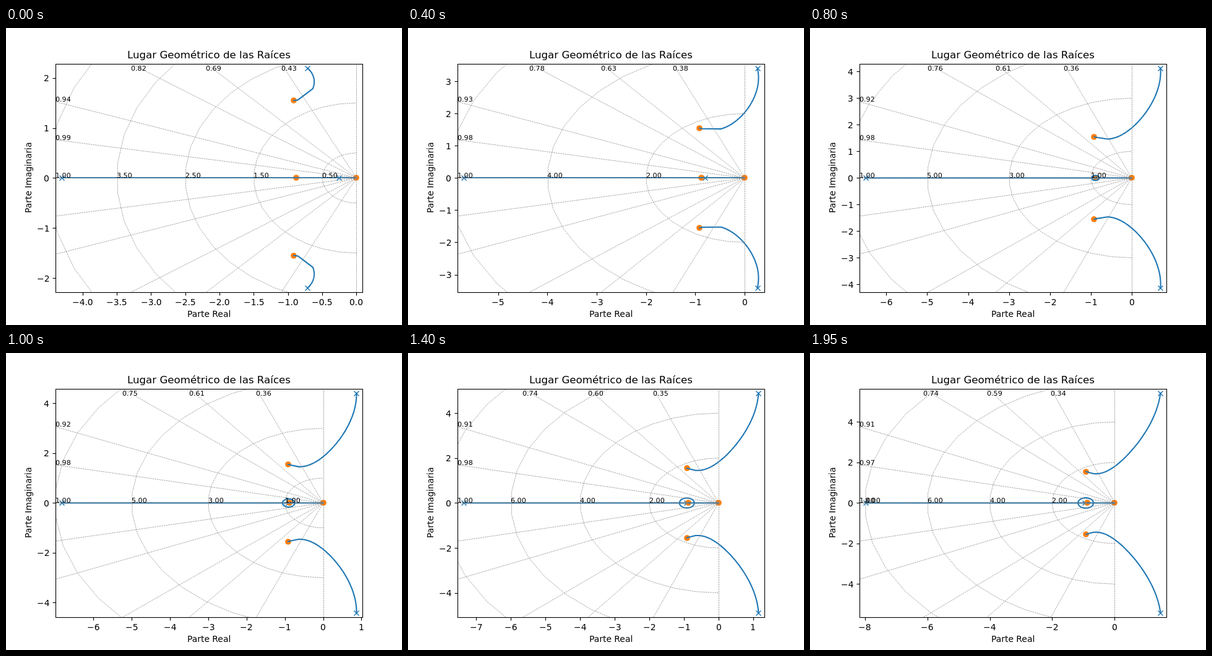
Write an HTML page with a canvas that moves like this. It is 640 px wide and 480 px high and loops after 2 s.

```html
<!DOCTYPE html>
<html lang="es">
<head>
<meta charset="utf-8">
<title>Lugar Geométrico de las Raíces</title>
<style>
html, body { margin: 0; width: 100%; height: 100%; overflow: hidden; background: #fff; }
canvas { display: block; }
</style>
</head>
<body>
<canvas id="stage" width="640" height="480"></canvas>
<script>
const ctx = document.getElementById('stage').getContext('2d');
const W = 640, H = 480, STEPS = 40, STEP_MS = 50;
const BOX = { l: 80, t: 57.6, r: 576, b: 427.2 };
const PT = 100 / 72;
const BLUE = '#1f77b4', ORANGE = '#ff7f0e', GRAY = '#808080';
const FONT = '"DejaVu Sans", Verdana, sans-serif';

// ---- complex numbers [re, im] and polynomials (highest power first)
const add = (a, b) => [a[0] + b[0], a[1] + b[1]];
const sub = (a, b) => [a[0] - b[0], a[1] - b[1]];
const mul = (a, b) => [a[0] * b[0] - a[1] * b[1], a[0] * b[1] + a[1] * b[0]];
const div = (a, b) => {
  const d = b[0] * b[0] + b[1] * b[1];
  return [(a[0] * b[0] + a[1] * b[1]) / d, (a[1] * b[0] - a[0] * b[1]) / d];
};
const abs = a => Math.hypot(a[0], a[1]);
const evalPoly = (p, z) => p.reduce((s, c) => add(mul(s, z), [c, 0]), [0, 0]);
const deriv = p => p.slice(0, -1).map((c, i) => c * (p.length - 1 - i));
function times(p, q) {
  const out = new Array(p.length + q.length - 1).fill(0);
  p.forEach((a, i) => q.forEach((b, j) => { out[i + j] += a * b; }));
  return out;
}

// Durand-Kerner, largest roots first
function roots(poly) {
  const p = poly.map(c => c / poly[0]), n = p.length - 1;
  let rad = 0;
  for (let i = 1; i <= n; i++) rad = Math.max(rad, Math.abs(p[i]) ** (1 / i));
  const z = [];
  for (let i = 0; i < n; i++) {
    const a = 2 * Math.PI * i / n + 0.4;
    z.push([rad * Math.cos(a), rad * Math.sin(a)]);
  }
  for (let it = 0; it < 300; it++) {
    let move = 0;
    for (let i = 0; i < n; i++) {
      let d = [1, 0];
      for (let j = 0; j < n; j++) if (j !== i) d = mul(d, sub(z[i], z[j]));
      if (abs(d) === 0) continue;
      const s = div(evalPoly(p, z[i]), d);
      z[i] = sub(z[i], s);
      move = Math.max(move, abs(s));
    }
    if (move < 1e-12) break;
  }
  for (const r of z) if (Math.abs(r[1]) < 1e-6) r[1] = 0;
  return z.sort((a, b) => {
    const d = abs(b) - abs(a);
    return Math.abs(d) > 1e-8 ? d : b[1] - a[1];
  });
}

// ---- root locus
const NUM = [1, 19 / 7, 34 / 7, 20 / 7, 0];
const ZEROS = roots(NUM.slice(0, 4)).concat([[0, 0]]);

// Keeps each branch in its own column by nearest neighbour
function sortRows(rows) {
  let prev = null;
  return rows.map(row => {
    if (!prev) return (prev = row.z);
    const out = [], free = prev.map((_, i) => i);
    for (const e of row.z) {
      let best = 0;
      free.forEach((c, i) => {
        if (abs(sub(e, prev[c])) < abs(sub(e, prev[free[best]]))) best = i;
      });
      out[free.splice(best, 1)[0]] = e;
    }
    return (prev = out);
  });
}

function limits(v) {
  const lo = Math.min(...v), hi = Math.max(...v), d = (hi - lo) * 0.02;
  return { lo: lo - d, hi: hi + d, tol: (hi - lo) * 0.05 };
}

function locus(gain) {
  const den = [1, 6, 13, 20 + 6 * gain, 6 * gain];
  const poles = roots(den);
  const rowAt = k => ({ k, z: roots(den.map((c, i) => c + k * NUM[i])) });

  const a = times(den, deriv(NUM)), b = times(NUM, deriv(den));
  const breaks = roots(a.map((c, i) => c - b[i]).slice(1))
    .map(s => ({ s, k: -div(evalPoly(den, s), evalPoly(NUM, s))[0] }))
    .filter(o => o.k >= 0);

  const kmax = Math.max(3, ...breaks.map(o => o.k));
  const ks = breaks.map(o => o.k);
  for (let i = 0; i < 50; i++) ks.push(kmax * i / 49);
  let rows = ks.sort((x, y) => x - y).map(rowAt);
  let mat = sortRows(rows);

  const pts = mat.flat().concat(ZEROS, poles, breaks.map(o => o.s));
  const xl = limits(pts.map(p => p[0])), yl = limits(pts.map(p => p[1]));
  const tol = Math.min(xl.tol, yl.tol);

  // refine wherever neighbours lie too far apart
  for (let pass = 0; pass < 10 && rows.length < 1500; pass++) {
    const next = [];
    rows.forEach((r, i) => {
      next.push(r);
      if (i + 1 < rows.length && mat[i].some((z, c) => abs(sub(mat[i + 1][c], z)) > tol)) {
        const dk = (rows[i + 1].k - r.k) / 4;
        for (let j = 1; j < 4; j++) next.push(rowAt(r.k + dk * j));
      }
    });
    if (next.length === rows.length) break;
    rows = next;
    mat = sortRows(rows);
  }
  for (const f of [10, 100, 1000]) rows.push(rowAt(kmax * f));
  mat = sortRows(rows);
  return { poles, xl, yl, branches: [0, 1, 2, 3].map(c => mat.map(r => r[c])) };
}

// ---- axes
function ticks(lim) {
  const raw = (lim.hi - lim.lo) / 9;
  const scale = 10 ** Math.floor(Math.log10(raw));
  const step = [1, 2, 2.5, 5, 10].map(s => s * scale).find(s => s >= raw);
  const out = [];
  for (let i = Math.floor(lim.lo / step); i <= Math.ceil(lim.hi / step); i++) out.push(i * step);
  return { step, all: out, shown: out.filter(v => v >= lim.lo && v <= lim.hi) };
}
const snap = v => Math.floor(v + 0.5) + 0.5;
const label = (v, step) => (v < 0 ? '\u2212' : '') + Math.abs(v).toFixed(step < 1 ? 1 : 0);

function text(str, x, y, size, align = 0) {
  ctx.font = size * PT + 'px ' + FONT;
  ctx.fillStyle = '#000';
  ctx.fillText(str, Math.round(x - ctx.measureText(str).width * align), Math.round(y));
}

function stroke(pts, color, width, cap = 'butt') {
  ctx.strokeStyle = color;
  ctx.lineWidth = width;
  ctx.lineCap = cap;
  ctx.lineJoin = 'round';
  ctx.beginPath();
  pts.forEach(p => ctx.lineTo(p[0], p[1]));
  ctx.stroke();
}

function clipSpan(a, b) {
  const dx = b[0] - a[0], dy = b[1] - a[1];
  let t0 = 0, t1 = 1;
  for (const [p, q] of [[-dx, a[0] + 1], [dx, W + 1 - a[0]], [-dy, a[1] + 1], [dy, H + 1 - a[1]]]) {
    if (p === 0) { if (q < 0) return null; }
    else if (p < 0) t0 = Math.max(t0, q / p);
    else t1 = Math.min(t1, q / p);
  }
  return t0 < t1 ? [t0, t1] : null;
}

// Thin dashed line; dashes restart where it enters the stage
function dashed(pts) {
  ctx.strokeStyle = GRAY;
  ctx.lineWidth = 0.5 * PT;
  ctx.lineCap = 'butt';
  ctx.setLineDash([1.85 * PT, 0.8 * PT]);
  ctx.beginPath();
  for (let i = 1; i < pts.length; i++) {
    const a = pts[i - 1], b = pts[i], s = clipSpan(a, b);
    if (!s) continue;
    const at = t => [a[0] + (b[0] - a[0]) * t, a[1] + (b[1] - a[1]) * t];
    if (i === 1 || s[0] > 0) ctx.moveTo(...at(s[0]));
    ctx.lineTo(...at(s[1]));
  }
  ctx.stroke();
  ctx.setLineDash([]);
}

function draw(m) {
  const { xl, yl } = m;
  const X = v => BOX.l + (v - xl.lo) / (xl.hi - xl.lo) * (BOX.r - BOX.l);
  const Y = v => BOX.b - (v - yl.lo) / (yl.hi - yl.lo) * (BOX.b - BOX.t);
  const xt = ticks(xl), yt = ticks(yl), far = xt.all[0];
  const notes = [];

  ctx.fillStyle = '#fff';
  ctx.fillRect(0, 0, W, H);
  ctx.save();
  ctx.beginPath();
  ctx.rect(80, 58, 496, 369);
  ctx.clip();

  for (const [re, im] of m.poles) {
    const x = snap(X(re)), y = snap(Y(im));
    stroke([[x - 4, y - 4], [x + 4, y + 4]], BLUE, PT);
    stroke([[x - 4, y + 4], [x + 4, y - 4]], BLUE, PT);
  }
  ctx.fillStyle = ORANGE;
  for (const [re, im] of ZEROS) {
    ctx.beginPath();
    ctx.arc(Math.round(X(re)), Math.round(Y(im)), 3.5 * PT, 0, 2 * Math.PI);
    ctx.fill();
  }
  for (const branch of m.branches) {
    const flat = branch.every(z => z[1] === 0);
    stroke(branch.map(z => [X(z[0]), flat ? Math.round(Y(0)) : Y(z[1])]), BLUE, 1.5 * PT, 'square');
  }

  // damping rays: three reach the top edge, two the left edge, one is the axis
  const ray = (x, y, tx, ty) => {
    const slope = y / x;
    dashed([[X(0), Y(0)], [X(far), Y(slope * far)]]);
    dashed([[X(0), Y(0)], [X(far), Y(-slope * far)]]);
    notes.push([(-x / Math.hypot(x, y)).toFixed(2), tx, ty]);
  };
  for (let i = 1; i < 4; i++) {
    const x = xl.lo * i / 4;
    ray(x, yl.hi, X(x), BOX.t + 0.03 * (BOX.b - BOX.t));
  }
  for (let i = 2; i > 0; i--) ray(xl.lo, yl.hi * i / 3, BOX.l, Y(yl.hi * i / 3));
  const mid = snap(Y(0));
  for (let i = 0; i < 2; i++) dashed([[snap(X(0)), mid], [snap(X(far)), mid]]);
  notes.push(['1.00', BOX.l, Y(0)]);
  dashed([[snap(X(0)), BOX.b], [snap(X(0)), BOX.t]]);

  // natural frequency arcs
  let wn = xt.all;
  while (wn.length > 7) wn = wn.slice(0, -1).filter((_, i) => i % 2 === 0);
  for (const om of wn) {
    if (om >= 0) continue;
    const arc = [];
    for (let i = 0; i < 20; i++) {
      const a = (i / 19 - 0.5) * Math.PI;
      arc.push([X(om * Math.cos(a)), Y(-om * Math.sin(a))]);
    }
    dashed(arc);
    if (om > xl.lo) notes.push([(-om).toFixed(2), X(om), Y(0)]);
  }
  ctx.restore();

  const thin = 0.8 * PT;
  for (const v of xt.shown) {
    stroke([[snap(X(v)), 427.5], [snap(X(v)), 432.5]], '#000', thin);
    text(label(v, xt.step), X(v), 448, 10, 0.5);
  }
  for (const v of yt.shown) {
    stroke([[80.5, snap(Y(v))], [75.5, snap(Y(v))]], '#000', thin);
    text(label(v, yt.step), 70.28, Y(v) + 5.5, 10, 1);
  }
  ctx.lineJoin = 'miter';
  ctx.lineWidth = thin;
  ctx.strokeRect(80.5, 58.5, 496, 369);

  for (const [s, x, y] of notes) text(s, x, y, 8);
  text('Lugar Geométrico de las Raíces', 328, 49, 12, 0.5);
  text('Parte Real', 328, 467, 10, 0.5);
  ctx.save();
  ctx.translate(41, 242);
  ctx.rotate(-Math.PI / 2);
  text('Parte Imaginaria', 0, 0, 10, 0.5);
  ctx.restore();
}

const models = [];
let shown = -1;
function tick() {
  const n = Math.floor(performance.now() / STEP_MS) % STEPS;
  if (n !== shown) {
    models[n] = models[n] || locus(n + 1);
    draw(models[n]);
    shown = n;
  }
  requestAnimationFrame(tick);
}
tick();
</script>
</body>
</html>
```
